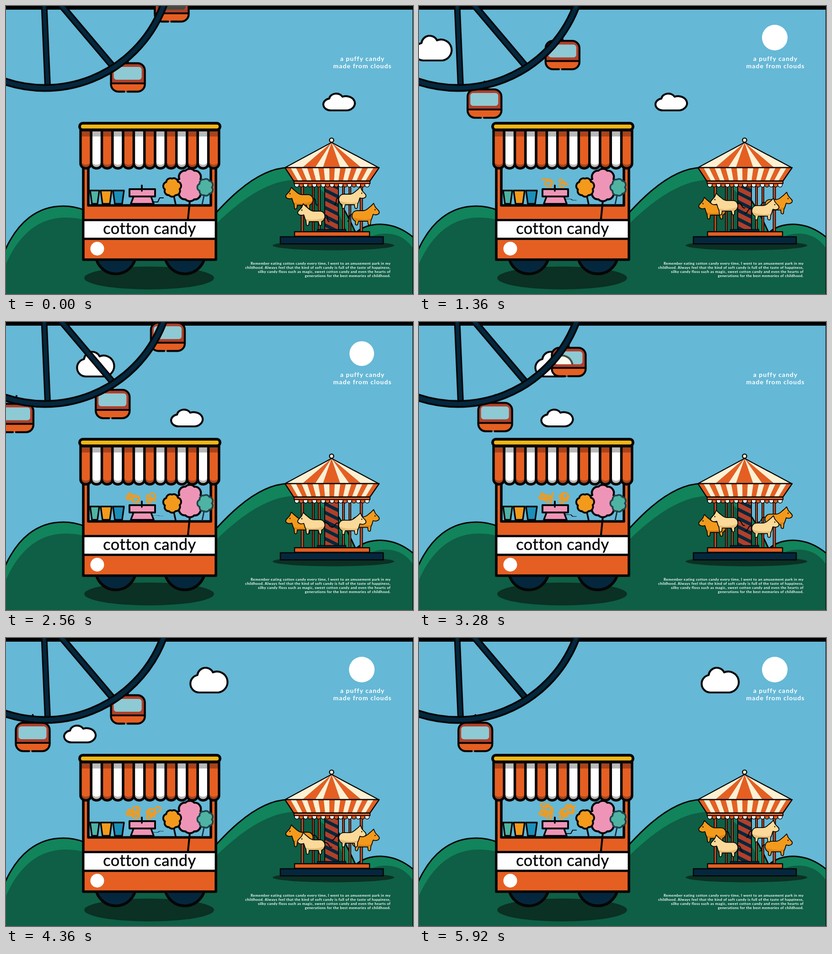
Recreate the animation shown at these times as an HTML page. Size 890 px wide and 629 px high, loop 5960 ms.

```html
<!DOCTYPE html>
<html lang="en">
<head>
<meta charset="utf-8">
<title>Cotton candy fair</title>
<style>
html, body { margin: 0; width: 100%; height: 100%; overflow: hidden; background: #65b8d6 }
svg { display: block; width: 890px; height: 629px }
text { font-family: Lato, "Open Sans", sans-serif; fill: #fff }
.ink { stroke: #060606; stroke-linejoin: round; stroke-linecap: round }
.open { fill: none }
</style>
</head>
<body>
<svg id="stage" viewBox="0 0 890 629"></svg>
<script>
const LOOP = 5960, STEP = 40;
const ORANGE = '#e55f22', RED = '#b0402a', AMBER = '#f39a1c', CREAM = '#fff0d2', TAN = '#fbd998';
const NAVY = '#04273d', TEAL = '#4fb3a3', PINK = '#ee95b7', DARK = '#0e5f45', LIGHT = '#11845c', SHADE = '#0b3024';

const range = (n, f) => Array.from({ length: n }, (_, i) => f(i)).join('');
const path = (d, fill, w = 0, more = '') =>
  `<path d="${d}" fill="${fill}" ${w ? `class="ink" stroke-width="${w}"` : ''} ${more}/>`;
const line = (d, w, color = '#060606') =>
  `<path class="open" d="${d}" stroke="${color}" stroke-width="${w}" stroke-linecap="round" stroke-linejoin="round"/>`;
const rect = (x, y, w, h, fill, sw = 0, rx = 0) =>
  `<rect x="${x}" y="${y}" width="${w}" height="${h}" rx="${rx}" fill="${fill}" ${sw ? `class="ink" stroke-width="${sw}"` : ''}/>`;
const oval = (x, y, rx, ry, fill, sw = 0) =>
  `<ellipse cx="${x}" cy="${y}" rx="${rx}" ry="${ry}" fill="${fill}" ${sw ? `class="ink" stroke-width="${sw}"` : ''}/>`;
const label = (x, y, size, spacing, anchor, str, more = '') =>
  `<text x="${x}" y="${y}" font-size="${size}" letter-spacing="${spacing}" text-anchor="${anchor}" ${more}>${str}</text>`;

// ---- sky and wheel
const cloud = id => `<g id="${id}">` + path(
  'M-22 24A19.2 19.2 0 0 1-26-14A18 18 0 0 1 8-20A23 23 0 1 1 20 24Z', '#fff', 4.2,
  'vector-effect="non-scaling-stroke"') + '</g>';

const cabin = i => `<g id="cabin${i}">` +
  line('M0-34V-48', 4) +
  path('M-37 13H37V17Q37 31 22 31H-22Q-37 31-37 17Z', ORANGE) +
  path('M-37 13V-15a16 16 0 0 1 16-16H21a16 16 0 0 1 16 16V13Z' +
    'M-25-23h49a6 6 0 0 1 6 6v16a6 6 0 0 1-6 6h-49a6 6 0 0 1-6-6v-16a6 6 0 0 1 6-6Z', RED, 0, 'fill-rule="evenodd"') +
  rect(-31, -23, 61, 28, 'rgba(235,240,205,.3)', 0, 6) +
  line('M-37 13H37', 4) +
  line('M-8 31H-21a16 16 0 0 1-16-16V-15a16 16 0 0 1 16-16H21a16 16 0 0 1 16 16V15a16 16 0 0 1-16 16H-1', 4.4) + '</g>';

const bar = (d, w) => line(d, w) + line(d, w * .54, NAVY);
const wheel = bar('M83-12L91 174', 14) + bar('M112-12L234 132', 15) +
  bar('M-192-98A277 277 0 0 0 362-98', 17);

const hills =
  path('M-4 538C25 470 70 437 125 437C200 437 250 500 300 560V640H-4Z', LIGHT, 3) +
  path('M400 522C470 433 545 352 620 353C690 358 735 420 775 520V640H400Z', LIGHT, 3) +
  path('M0 563C30 495 75 462 130 462C200 462 240 500 300 560V629H0Z', DARK) +
  path('M400 540C475 452 560 376 640 380C690 385 725 430 755 520V629H400Z', DARK) +
  path('M765 495C790 472 845 465 894 508V640H765Z', LIGHT, 3) +
  path('M770 520C800 495 835 492 860 503C875 510 885 521 892 532V629H770Z', DARK) +
  rect(150, 520, 690, 109, DARK) +
  oval(313, 594, 142, 25, SHADE) + oval(716, 523, 133, 10.5, SHADE);

// ---- candy cart
function stripe(i) {
  const x = 163 + i * 23.3, w = 23.3, even = i % 2 === 0;
  const shape = (top, low) => `M${x} ${top}H${x + w}V${low}a11.65 10.5 0 0 1-23.3 0Z`;
  return path(shape(271, 344), even ? '#a8431b' : '#b9b9b9') +
    path(shape(285, 336), even ? ORANGE : '#fff') + path(shape(271, 344), 'none', 5.4);
}

function puff(cx, cy, rx, ry, n, turn, fill, sw, ink = '#060606') {
  const pt = i => {
    const a = (i / n) * 2 * Math.PI + turn;
    return `${(cx + rx * Math.cos(a)).toFixed(1)} ${(cy + ry * Math.sin(a)).toFixed(1)}`;
  };
  const r = (rx + ry) / 2 * Math.sin(Math.PI / n) * 1.2;
  return `<path d="M${pt(0)}${range(n, i => `A${r} ${r} 0 0 1 ${pt(i + 1)}`)}Z" fill="${fill}" stroke="${ink}" stroke-width="${sw}" stroke-linejoin="round"/>`;
}

const cup = (x, w, fill) => path(`M${x} 403h${w}l-4 29h${8 - w}Z`, fill, 3.4);
const curl = d => `<path class="open curl" d="${d}" pathLength="1" stroke="${AMBER}" stroke-width="3.4"/>`;

const cart =
  oval(240, 541, 44, 44, NAVY, 6) + oval(391, 541, 44, 44, NAVY, 6) +
  path('M169 340H459V554H169ZM180 340H448V435.5H180Z', ORANGE, 5.6, 'fill-rule="evenodd"') +
  rect(169, 467.5, 290, 41, '#fff', 5) +
  cup(184, 20, TEAL) + cup(207, 24, AMBER) + cup(234, 24, '#1b8fb9') +
  curl('M287 396C294 388 290 379 280 382M280 382C272 387 277 395 285 393C295 389 294 379 281 379C269 377 261 381 263 384C268 391 279 389 275 379C271 371 264 374 268 381C276 393 291 387 293 374C290 365 276 366 277 376C280 385 291 380 287 371C282 361 265 359 266 366C268 371 282 369 284 361') +
  curl('M326 392C323 385 312 385 307 391C309 398 321 395 318 386C314 378 304 376 308 384C314 393 328 389 327 380C325 371 312 373 314 381C318 389 329 385 324 375C315 370 306 377 310 381C320 386 338 381 338 372C334 364 322 371 327 379C333 389 344 381 337 373C329 366 318 372 320 367C325 361 334 365 336 369L345 366') +
  line('M297 392V402', 3.4) +
  path('M279 416H317L323 432H273Z', PINK, 3.6) + rect(270, 400, 56, 16, PINK, 4) + line('M297 392V404', 3.4) +
  '<g id="crank">' + line('M-12 5H0L4-4H12', 2.2) + '</g>' +
  range(13, stripe) + rect(161, 256, 307, 14.5, '#f0b714', 6, 7) +
  line('M367 415L371 433', 3.6) + line('M402 425L398 465', 4.2) + line('M433 414L429 433', 3, '#16333a') +
  puff(402, 391, 25, 34, 8, .4, PINK, 4.4) +
  puff(363.5, 396, 16.5, 19, 7, .2, AMBER, 4) +
  puff(436, 396, 14, 17.5, 7, 0, TEAL, 3.6, '#1f444a') +
  label(314, 498, 34.5, .5, 'middle', 'cotton candy', 'style="fill:#080808;stroke:#080808;stroke-width:.5"') +
  oval(199.5, 530, 15, 15, '#fff');

// ---- carousel
const roofEdges = [610, 648, 676, 693, 731, 751, 777, 815];
const roof =
  range(7, i => path(`M712 298L${roofEdges[i]} 353H${roofEdges[i + 1]}Z`, i % 2 ? ORANGE : CREAM)) +
  path('M712 298L610 353H815Z', 'none', 2.4) +
  range(17, i => {
    const top = k => 610 + 206 * k / 17, low = k => 629 + 167 * k / 17;
    return path(`M${top(i)} 353H${top(i + 1)}L${low(i + 1)} 382H${low(i)}Z`, i % 2 ? CREAM : ORANGE);
  }) +
  path('M610 353H816L796 382H629Z', 'none', 2.4) +
  range(17, i => path(`M${631.2 + i * 9.6} 388h9.6v2.5a4.8 5 0 0 1-9.6 0Z`, i % 2 ? ORANGE : '#fff', 1.4)) +
  rect(630, 382.5, 166, 5.5, ORANGE, 2) + oval(712, 293, 4.6, 4.6, CREAM, 2.4);

const pole = (x, w) => rect(x - w / 2, 388, w, 106, '#c9532a', 1.8);
const column = `<clipPath id="post"><rect x="697" y="390" width="30" height="99"/></clipPath>` +
  rect(697, 390, 30, 99, RED) +
  `<g clip-path="url(#post)"><g id="twist">${range(9, i => path(`M697 ${360 + i * 19}l30 15v8l-30-15Z`, NAVY))}</g></g>` +
  rect(697, 390, 30, 99, 'none', 2) + rect(681, 488, 62, 6, NAVY, 1.6);

const horseShape = 'M13 0L19 6C24 9 27 15 35 16H50C60 17 62 27 59 33C58 36 55 38 53 39' +
  'L53 46Q50 49 48 46L46 39H26L25 46Q22 49 20 46L19 37C16 33 16 28 14 24C9 26 3 25 1 21C-1 16 7 13 10 7Z';
const horse = (id, fill, shade) => `<g id="${id}">` +
  `<g class="tail">${line('M58 24Q66 23 66 31T70 39', 2)}</g>` +
  path(horseShape, fill) +
  path('M17 33Q38 38 60 30C59 36 55 38 53 39H26L19 37Z', shade) +
  path(horseShape, 'none', 1.8) +
  oval(10, 14, 1.2, 1.4, '#060606') + '</g>';

const carousel =
  pole(672, 3.5) + pole(685, 4) + pole(738, 4) + pole(752, 4) + pole(648, 5) + pole(777, 5) + column +
  horse('outL', AMBER, '#dd8414') + horse('inL', TAN, '#e6bd76') +
  horse('outR', AMBER, '#dd8414') + horse('inR', TAN, '#e6bd76') +
  rect(631, 493, 164, 10, ORANGE, 2.4) + rect(600, 504, 225, 15.5, NAVY, 2.6) + roof;

// ---- words
const story = [
  'Remember eating cotton candy every time, I went to an amusement park in my',
  'childhood. Always feel that the kind of soft candy is full of the taste of happiness,',
  'silky candy floss such as magic, sweet cotton candy and even the hearts of',
  'generations for the best memories of childhood.'
];
const words =
  label(779.5, 120, 14, 1.05, 'middle', 'a puffy candy', 'font-weight="700"') +
  label(779.5, 136, 14, 1.05, 'middle', 'made from clouds', 'font-weight="700"') +
  story.map((s, i) => label(841, 565 + i * 9, 8, .37, 'end', s, 'font-weight="700"')).join('') +
  '<circle id="badge" cx="778" cy="69" fill="#fff"/>';

const stage = document.getElementById('stage');
stage.innerHTML = rect(0, 0, 890, 629, '#65b8d6') + hills +
  rect(0, 0, 890, 8, '#000') + rect(889, 0, 1, 629, '#000') +
  cloud('big') + cloud('small') + range(3, cabin) + wheel + cart + carousel + words;

const $ = id => document.getElementById(id);
const move = (id, x, y, more = '') => $(id).setAttribute('transform', `translate(${x} ${y}) ${more}`);
const curls = [...document.querySelectorAll('.curl')], tails = [...document.querySelectorAll('.tail')];
const passTimes = [0, 2158, 4360];

function draw(t) {
  const swing = 1 - Math.abs(1 - (t % 2000) / 1000); // 0 to 1 and back every two seconds

  move('big', 97.5 + .1377 * (t - 1840), 95);
  move('small', 729 - .13 * t, 211.7, 'scale(.85 .68)');

  passTimes.forEach((pass, i) => {
    const dt = t - pass, a = (39.1 - dt * (dt > 0 ? .0208 : .0176)) * Math.PI / 180;
    move('cabin' + i, 91 + 278.5 * Math.sin(a), -59 + 277 * Math.cos(a));
  });

  move('crank', 332, 423, `scale(1 ${1 - 2 * swing})`);
  curls.forEach(c => c.setAttribute('stroke-dasharray', `${t / LOOP} 2`));

  move('outL', 611, 396 + 34 * swing);
  move('inL', 637, 432 - [36, 29, 20][Math.floor(t / 2000)] * swing);
  move('inR', 788, 395 + 39 * swing, 'scale(-1 1)');
  move('outR', 817, 431 - 38 * swing, 'scale(-1 1)');
  const wag = -30 * Math.sin(Math.PI * swing);
  tails.forEach(e => e.setAttribute('transform', `rotate(${wag} 58 24)`));
  move('twist', 0, -19 * (t % 2000) / 2000);

  const age = t < 185 ? 0 : (t - 185) % 1505;
  $('badge').setAttribute('r', 28 * Math.min(1, Math.max(0, (age - 100) / 800)));
}

const start = performance.now();
function tick() {
  const t = (performance.now() - start) % LOOP;
  draw(Math.floor(t / STEP) * STEP);
  requestAnimationFrame(tick);
}
tick();
</script>
</body>
</html>
```
